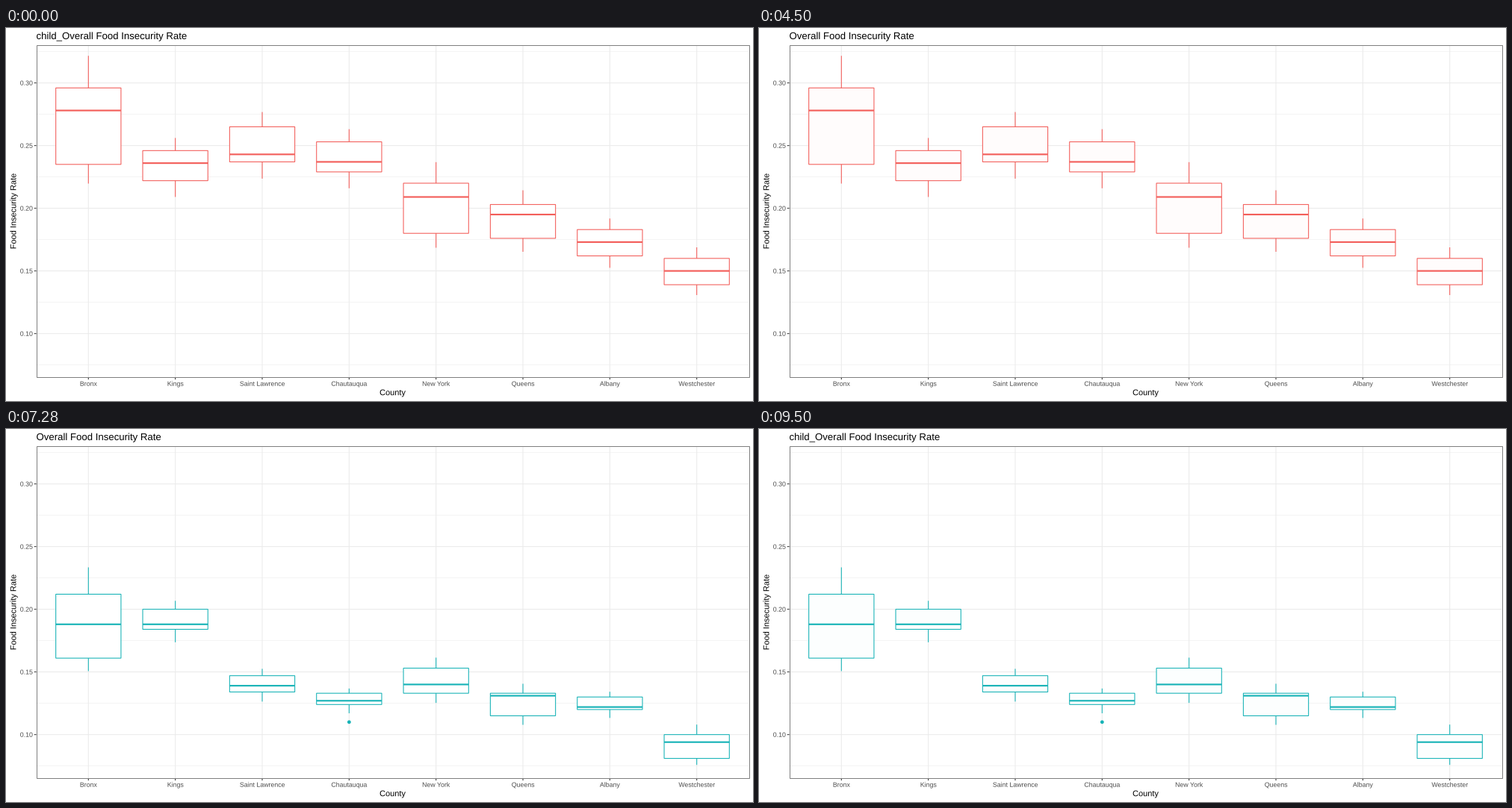
Write a matplotlib script that moves like this. It is 1000 px wide and 500 px high and loops after 10 s.

```python
import matplotlib.pyplot as plt
from matplotlib.animation import FuncAnimation
from matplotlib.patches import Circle, PathPatch, Rectangle
from matplotlib.textpath import TextPath
from matplotlib.transforms import Affine2D

W, H, DPI = 1000, 500, 100
PX = 72 / DPI  # points per pixel
STEP_MS, LOOP_MS = 100, 10000
HALF_MS = LOOP_MS // 2

LEFT, TOP, RIGHT, BOTTOM = 40.5, 23.2, 994.5, 468.45
LOW, HIGH = 65, 330  # value range of the panel, in thousandths
SLOT = (RIGHT - LEFT) / 8.2
GRID, TICK, LABEL = "#ebebeb", "#333333", "#4d4d4d"
RED, TEAL = "#f35e5a", "#17b3b7"

# County: quartiles in thousandths for children, then for everyone
COUNTIES = {
    "Bronx": ((235, 278, 296), (161, 188, 212)),
    "Kings": ((222, 236, 246), (184, 188, 200)),
    "Saint Lawrence": ((237, 243, 265), (134, 139, 147)),
    "Chautauqua": ((229, 237, 253), (124, 127, 133)),
    "New York": ((180, 209, 220), (133, 140, 153)),
    "Queens": ((176, 195, 203), (115, 131, 133)),
    "Albany": ((162, 173, 183), (120, 122, 130)),
    "Westchester": ((139, 150, 160), (81, 94, 100)),
}

plt.rcParams["font.family"] = "Liberation Sans"
fig = plt.figure(figsize=(W / DPI, H / DPI), dpi=DPI, facecolor="white")
ax = fig.add_axes([0, 0, 1, 1])
ax.set_xlim(0, W)
ax.set_ylim(H, 0)
ax.axis("off")


def x_at(i):
    return LEFT + SLOT * (0.6 + i)


def y_at(v):
    return TOP + (HIGH - v) / (HIGH - LOW) * (BOTTOM - TOP)


def line(x0, y0, x1, y1, color, width, z):
    return ax.plot([x0, x1], [y0, y1], color=color, lw=width * PX, zorder=z,
                   solid_capstyle="butt", snap=False)[0]


def label(x, y, s, size, color="black", align=0.5, angle=0):
    """Text on baseline (x, y); align runs from 0 (left) to 1 (right)."""
    path = TextPath((0, 0), s, size=size)
    place = (Affine2D().translate(-align * path.get_extents().x1, 0)
             .rotate_deg(angle).scale(1, -1).translate(x, y))
    return ax.add_patch(PathPatch(place.transform_path(path), fc=color, lw=0,
                                  zorder=7, snap=False))


def draw_panel():
    for v in range(75, 326, 50):
        line(LEFT, y_at(v), RIGHT, y_at(v), GRID, 0.53, 1)
    for v in range(100, 301, 50):
        y = y_at(v)
        line(LEFT, y, RIGHT, y, GRID, 1.07, 1)
        line(LEFT - 2.75, y, LEFT, y, TICK, 1.07, 5)
        label(LEFT - 4.95, y + 3.1, f"{v / 1000:.2f}", 8.8, LABEL, align=1)
    for i, name in enumerate(COUNTIES):
        x = x_at(i)
        line(x, TOP, x, BOTTOM, GRID, 1.07, 1)
        line(x, BOTTOM, x, BOTTOM + 2.75, TICK, 1.07, 5)
        label(x, 479.75, name, 8.8, LABEL)
    ax.add_patch(Rectangle((LEFT, TOP), RIGHT - LEFT, BOTTOM - TOP, fill=False,
                           ec="#7f7f7f", lw=PX, zorder=6))
    label((LEFT + RIGHT) / 2, 492.2, "County", 11)
    label(13.4, (TOP + BOTTOM) / 2, "Food Insecurity Rate", 11, angle=90)


def draw_boxes(group, color):
    """Return the box patches and every artist of one group."""
    boxes, parts = [], []
    half = SLOT * 0.375
    for i, groups in enumerate(COUNTIES.values()):
        q1, med, q3 = groups[group]
        # Whiskers reach in proportion to the median and the box height
        low, high = q1 - 0.055 * med, q3 + 0.42 * (q3 - q1)
        x = x_at(i)
        box = Rectangle((x - half, y_at(q3)), 2 * half, y_at(q1) - y_at(q3),
                        ec=color, lw=1.07 * PX, zorder=3, snap=False)
        boxes.append(ax.add_patch(box))
        parts += [line(x, y_at(low), x, y_at(q1), color, 1.07, 3),
                  line(x, y_at(q3), x, y_at(high), color, 1.07, 3),
                  line(x - half, y_at(med), x + half, y_at(med), color, 2.13, 4)]
    return boxes, boxes + parts


draw_panel()
child_title, overall_title = (
    label(LEFT, 14.95, prefix + "Overall Food Insecurity Rate", 13.2, align=0)
    for prefix in ("child_", ""))
red_boxes, red_parts = draw_boxes(0, RED)
teal_boxes, teal_parts = draw_boxes(1, TEAL)
teal_parts.append(ax.add_patch(Circle((x_at(3), y_at(110)), 2.4, fc=TEAL,
                                      ec="none", zorder=4)))


def show(parts, visible):
    for part in parts:
        part.set_visible(visible)


def update(n):
    t = n * STEP_MS
    show(red_parts, t < HALF_MS)
    show(teal_parts, t >= HALF_MS)

    # The title switches half a second ahead of the boxes
    overall = HALF_MS <= t + 500 < LOOP_MS
    show([overall_title], overall)
    show([child_title], not overall)

    # Boxes take a faint tint before each switch
    tinted = t % HALF_MS >= 3800
    for boxes, tint in ((red_boxes, "#fffcfc"), (teal_boxes, "#fcfefe")):
        for box in boxes:
            box.set_facecolor(tint if tinted else "white")
    return [child_title, overall_title, *red_parts, *teal_parts]


anim = FuncAnimation(fig, update, frames=LOOP_MS // STEP_MS, interval=STEP_MS,
                     repeat=True, repeat_delay=0)
plt.show()
```
